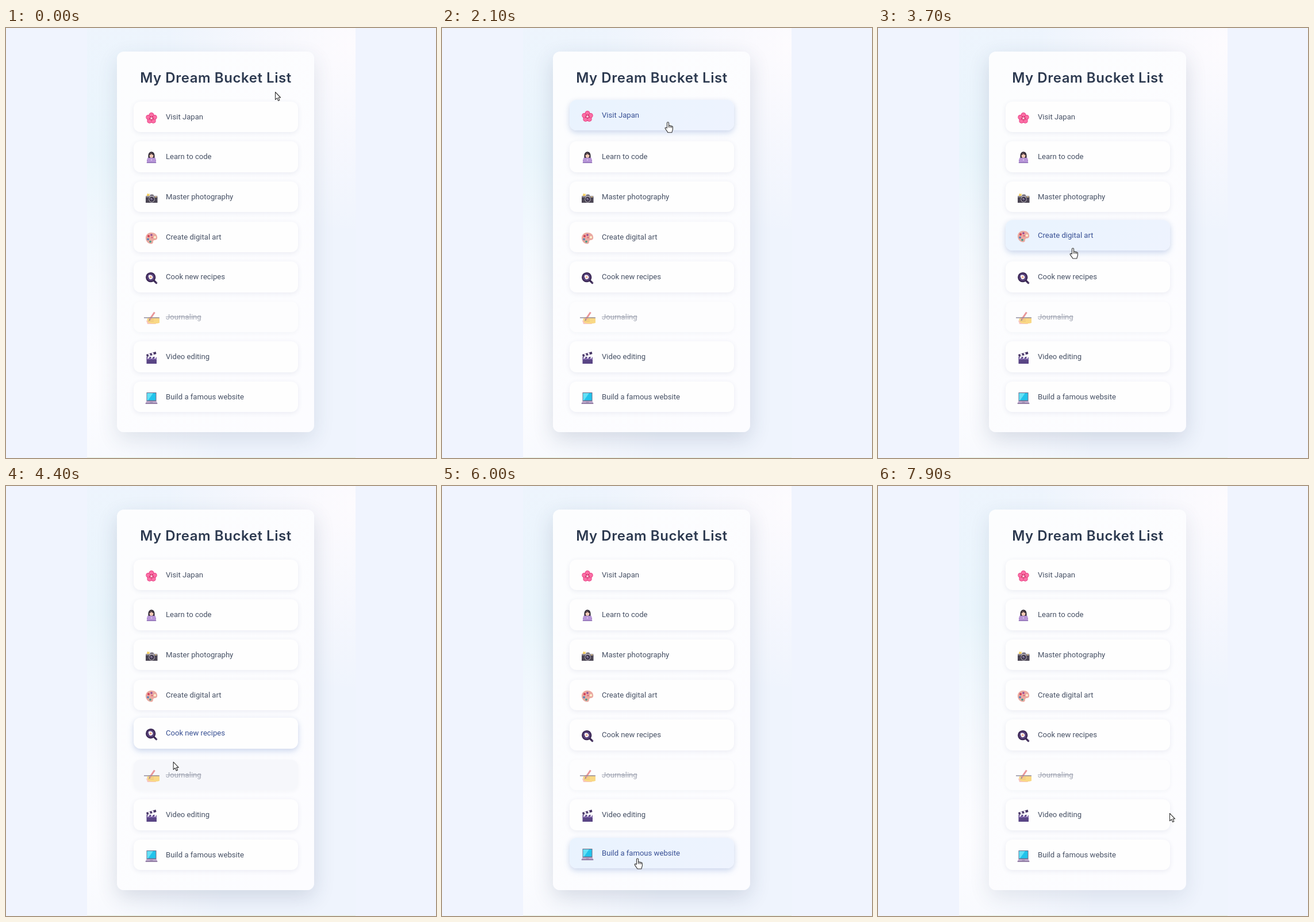
These frames come from a looping animation (748x748 px, 8 s). An HTML page:

```html
<!DOCTYPE html>
<html lang="en">
<head>
<meta charset="utf-8">
<title>My Dream Bucket List</title>
<style>
html, body { margin: 0; width: 100%; height: 100%; overflow: hidden; background: #f0f4fe; }
div, svg { position: absolute; }
svg { overflow: visible; }
#stage { width: 748px; height: 748px; overflow: hidden; }
#page {
  left: 141px; width: 467px; height: 748px;
  background:
    linear-gradient(#e4f0e2, #e4f0e2) 0 100% / 100% 1px no-repeat,
    radial-gradient(circle 330px at 100% 4%, #fdfbfe, #fdfbfe00),
    radial-gradient(ellipse 250px 400px at 0 82%, #fdfdff, #fdfdff00),
    radial-gradient(circle 340px at 8% 32%, #e9f5fc, #e9f5fc00),
    #eff4fd;
}
#card {
  left: 193px; top: 41px; width: 343px; height: 662px; border-radius: 12px;
  background: linear-gradient(120deg, #fcfdfe, #fcfcff);
  box-shadow: 0 12px 36px rgba(45, 62, 92, var(--shade));
}
#title {
  left: 0; top: 26px; width: 344px; height: 40px;
  font: 600 24px/40px Poppins, Inter, sans-serif; letter-spacing: .55px;
  color: #2d3a50; text-align: center; white-space: nowrap;
}
.item {
  --h: 0;
  left: 29px; width: 286px; height: 53.5px; border-radius: 12px;
  font: 13.1px/53.5px Roboto, sans-serif; white-space: nowrap;
  background: #fefefe;
  color: color-mix(in srgb, #385094 calc(var(--h) * 100%), #465064);
  transform: translateY(calc(var(--h) * -3px));
  box-shadow: 0 2px 8px rgba(60, 70, 120, .09),
    0 5px 12px rgba(90, 140, 215, calc(var(--h) * .2));
}
.item.on { background: linear-gradient(135deg, #e9f3fe, #eef3fe); }
.item span { position: absolute; left: 56px; }
.item svg { left: 21px; top: 19px; }
.item.done { color: #70768a; opacity: calc(.65 - var(--h) * .22); transform: none; box-shadow: 0 2px 8px rgba(60, 70, 120, .07); }
.item.done.on { background: #f3f5fa; }
.done span { text-decoration: line-through; }
#cursor path { fill: #fff; stroke: #333; stroke-width: 1.1; stroke-linejoin: round; }
</style>
</head>
<body>
<div id="stage">
  <div id="page"></div>
  <div id="card"><div id="title">My Dream Bucket List</div></div>
  <svg id="cursor" width="20" height="20">
    <path id="arrow" d="M.5 .5V13.6L3.6 10.8L5.6 15.6L7.9 14.6L5.9 10H9.6Z"/>
    <path id="hand" d="M-1.5 10V1.5a1.5 1.5 0 0 1 3 0V6.4c.4-1 2.3-.8 2.5.3c.5-.8 2.1-.6 2.4.5c.7-.6 2 0 2 1.2V12c0 2-1.2 3-1.5 6H-.2c-.4-2-3.2-4-4.5-7c-.7-1.6 1.2-2.4 3.2-.3M1.5 6.4V9.4M4 7V9.8M6.4 7.6V10"/>
  </svg>
</div>
<script>
const $ = id => document.getElementById(id);
const shape = (fill, d, extra = '') => `<path fill="${fill}" d="${d}" ${extra}/>`;
const dot = (fill, x, y, rx, ry = rx) => `<ellipse fill="${fill}" cx="${x}" cy="${y}" rx="${rx}" ry="${ry}"/>`;
const ring = draw => [0, 72, 144, 216, 288].map(a => `<g transform="rotate(${a} 10 10)">${draw}</g>`).join('');

const blossom = ring(dot('#e83f83', 10, 4.6, 4.4, 4.6)) + ring(dot('#fb6fa6', 10, 4.2, 3.2, 3.3)) +
  dot('#d42c69', 10, 10, 3.8) + ring(shape('#ffe3ee', 'M9.3 10L10 5.4L10.7 10Z'));
const coder = shape('#29232f', 'M4.5 11V6C4.5 -3 15.5 -3 15.5 6V11Z') + dot('#f2c9b4', 10, 5.8, 3.5, 4.2) +
  shape('#29232f', 'M6.3 5C7 1 13 1 13.7 5C11 4.5 10.5 3.5 10 2.8C9 4 8 4.8 6.3 5Z') +
  shape('#7a5aa5', 'M2 16C2 10 6 10 10 10S18 10 18 16Z') +
  shape('#b795d8', 'M3 9.8H17L18 18H2Z') + shape('#8e70b5', 'M1.8 17.5H18.2V19H1.8Z') + dot('#e5d3f3', 10, 13.5, 1.1);
const camera = shape('#f4cf61', 'M2 4L3.5 1.5L5 3L7 2L6.5 6H2Z') + shape('#77727e', 'M7 6L8.5 3.5H13L14.5 6Z') +
  shape('#98929c', 'M0 6H20.5V10H0Z') + shape('#4a4553', 'M0 8.5H20.5V18H0Z') +
  dot('#b9b1bd', 10.5, 12, 5.2) + dot('#302b3b', 10.5, 12, 4.2) + dot('#665b7d', 10.5, 12, 2.4) +
  dot('#c7bfd3', 9.4, 10.8, .9) + shape('#e0c078', 'M16 7H19V8.5H16Z');
const palette = shape('#eaa9a0', 'M0 11C-1 4 5 -1 11 0C18 0 21 6 20 10C19 14 15 12 13.5 14C12 16 14 19 10 19.5C5 20 1 16 0 11Z') +
  dot('#fff2cf', 16, 8, 2) + dot('#d43d55', 5, 6, 2) + dot('#8c4a96', 10, 4, 1.8) + dot('#5b83b5', 4, 11.5, 1.9) +
  dot('#dc5c74', 11, 8.5, 1.3) + dot('#4c9a8a', 8, 15.6, 1.9);
const pan = shape('none', 'M13 13L18.5 18.5', 'stroke="#3a2854" stroke-width="3.2" stroke-linecap="round"') +
  dot('#a291b8', 18.3, 18.2, .6) + dot('#3a2854', 8.7, 8.6, 8.7) + dot('#59417a', 8.7, 8.6, 6.6) +
  shape('#fff', 'M5 8C4 4 8 4 10 5S13 8 12 10S8 13 6.5 11.5Z') + dot('#f3ad94', 8.7, 8.3, 1.9);
const writing = shape('#f7a9a0', 'M1 14L15 12L18 20H3Z') +
  shape('#f8c546', 'M2 12C5 7 9 7 12 9L20 8L24 10V18C18 20 10 19 5 18Z') +
  shape('none', 'M4 15H14M6 12H14', 'stroke="#dd962d" stroke-width=".9"') +
  shape('none', 'M15.5 -.5L7 12', 'stroke="#e06266" stroke-width="3"') + shape('#5b4a55', 'M6 11L8.5 13L5.5 14.5Z') +
  shape('none', 'M-3 9H24', 'stroke="#514865" stroke-width="1.4"');
const clapper = shape('#594585', 'M1.5 8H19V20H1.5Z') + shape('#8168ac', 'M1.5 11H19V13H1.5Z') +
  shape('#453464', 'M1 4L17.5 -1L18.5 3L2 8Z') +
  shape('#f0ebf7', 'M4 3.1L7 2.2L8.5 6L5.5 6.9ZM10 1.3L13 .4L14.5 4.2L11.5 5.1ZM4 8H7L5.5 11H2.5ZM10 8H13L11.5 11H8.5ZM16 8H19L17.5 11H14.5Z');
const laptop = shape('#6d6684', 'M1.5 0H18.5V15H1.5Z') + shape('#22c3eb', 'M2.5 1H17.5V13.7H2.5Z') +
  shape('#64e0f5', 'M2.5 1H13L4 13.7H2.5Z') + shape('#bda8cc', 'M1.5 15H18.5L20.3 19H-.3Z') +
  shape('#8d789f', 'M-.3 18.2H20.3V20H-.3ZM7.5 16.4H12.5V17.6H7.5Z');

// label, icon, hover start and end in ms
const items = [
  ['Visit Japan', blossom, 1180, 2280],
  ['Learn to code', coder, 2300, 2880],
  ['Master photography', camera, 2950, 3360],
  ['Create digital art', palette, 3380, 3780],
  ['Cook new recipes', pan, 3860, 4370],
  ['Journaling', writing, 4400, 5340],
  ['Video editing', clapper, 5360, 5570],
  ['Build a famous website', laptop, 5590, 7450]
].map(([label, icon, start, end], i) => {
  const el = document.createElement('div');
  el.className = i === 5 ? 'item done' : 'item';
  el.style.top = 86.7 + i * 69.6 + 'px';
  el.innerHTML = `<svg width="20" height="20">${icon}</svg><span>${label}</span>`;
  $('card').append(el);
  return { el, start, end };
});

// time, x, y of the pointer tip
const path = [
  [0, 468, 111], [400, 462, 112], [500, 462, 112], [800, 455, 110], [1000, 455, 110],
  [1200, 402, 144], [2200, 392, 166], [2500, 388, 215], [2800, 384, 232], [2900, 379, 283],
  [3300, 362, 310], [3400, 355, 350], [3700, 339, 383], [3900, 325, 425], [4300, 298, 465],
  [4600, 276, 509], [5300, 273, 512], [5500, 300, 575], [5600, 318, 632], [6000, 340, 648],
  [6600, 347, 645], [7100, 352, 646], [7400, 470, 628], [7600, 522, 600], [7900, 507, 569], [8000, 507, 569]
];
const clamp = x => Math.min(1, Math.max(0, x));
const ease = x => 1 - (1 - clamp(x)) ** 2 * (1 + 2 * clamp(x));
const within = (t, a, b) => t >= a && t < b;

function draw(now) {
  const t = Math.floor(now % 8000 / 100) * 100;
  for (const { el, start, end } of items) {
    el.classList.toggle('on', within(t, start, end));
    el.style.setProperty('--h', ease((t - start) / 300) - ease((t - end) / 300));
  }
  const k = path.findIndex(p => p[0] > t);
  const [t0, x0, y0] = path[k - 1], [t1, x1, y1] = path[k];
  const f = (t - t0) / (t1 - t0);
  $('cursor').style.transform = `translate(${x0 + (x1 - x0) * f}px, ${y0 + (y1 - y0) * f}px)`;
  const pointing = within(t, 1180, 4400) || within(t, 5360, 7450);
  $('hand').style.display = pointing ? '' : 'none';
  $('arrow').style.display = pointing ? 'none' : '';
  $('card').style.setProperty('--shade', .12 + .04 * ease(t / 400) - .05 * ease((t - 7400) / 500));
  requestAnimationFrame(() => draw(performance.now() - began));
}
const began = performance.now();
draw(0);
</script>
</body>
</html>
```
